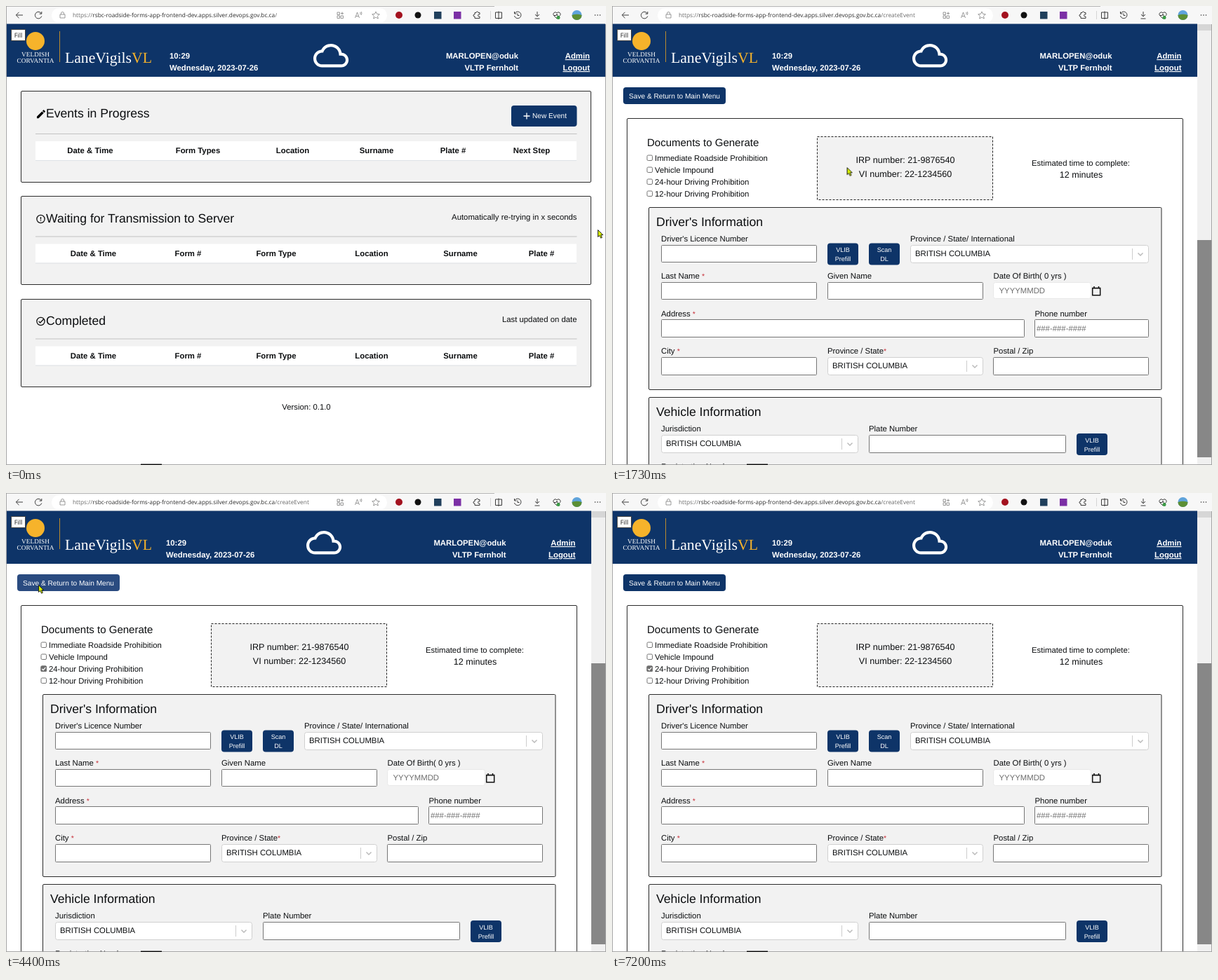
Recreate the animation shown at these times as an HTML page. Size 855 by 655 pixels, loop 8 s.

```html
<!DOCTYPE html>
<html lang="en">
<head>
<meta charset="utf-8">
<title>Roadside forms</title>
<style>
html, body { margin: 0; width: 100%; height: 100%; overflow: hidden; background: #fff; }
svg { display: block; }
text { font: 11.35px "Liberation Sans", Arial, sans-serif; fill: #0c0e10; text-rendering: geometricPrecision; white-space: pre; }
.b { font-weight: bold; }
.w { fill: #fff; }
.h { font-size: 17.6px; }
.doc { font-size: 15px; }
.num { font-size: 12.6px; }
.btn { font-size: 10.15px; fill: #fff; }
.small { font-size: 9.1px; fill: #fff; }
.hint { fill: #6c6c6c; }
.star { fill: #c8323c; font-size: 10.5px; }
.url { font: 8.32px "Open Sans", "Noto Sans", sans-serif; fill: #6a6a6a; }
.host { fill: #2b2b2b; }
.fill { font: 9px "Open Sans", "Noto Sans", sans-serif; fill: #111; }
.status { font: 7.18px "Open Sans", "Noto Sans", sans-serif; fill: #222; }
.brand { font: 21.7px "Liberation Serif", serif; }
.crest { font: 9.3px "Liberation Serif", serif; fill: #fff; }
.u { text-decoration: underline; }
.line { fill: none; stroke: #3c3c3c; stroke-width: 1; }
.soft { fill: none; stroke: #808080; stroke-width: .8; }

.home, .form, .late, .thumb, .status-bar, .over1, .over3 { animation: 8s step-end infinite; }
.home { animation-name: leave; }
.form { animation-name: enter; }
.status-bar { animation-name: loaded; }
.late { animation-name: check; }
.thumb { animation-name: grow; }
.over1 { animation-name: hover1; }
.over3 { animation-name: hover3; }
.save { fill: #0e3468; animation: save 8s linear infinite; }
.cursor { animation: move 8s linear infinite, vanish 8s step-end infinite; }

@keyframes leave { 0% { opacity: 1 } 13.37% { opacity: 0 } 100% { opacity: 0 } }
@keyframes enter { 0% { opacity: 0 } 13.37% { opacity: 1 } 100% { opacity: 1 } }
@keyframes loaded { 0% { opacity: 1 } 21.2% { opacity: 0 } 100% { opacity: 0 } }
@keyframes check { 0% { opacity: 0 } 37.49% { opacity: 1 } 100% { opacity: 1 } }
@keyframes grow { 0% { transform: none } 39.99% { transform: translateY(-91px) } 100% { transform: translateY(-91px) } }
@keyframes hover3 { 0% { stroke: #767676 } 27.4% { stroke: #4f4f4f } 44.5% { stroke: #767676 } 100% { stroke: #767676 } }
@keyframes hover1 { 0% { stroke: #767676 } 46% { stroke: #4f4f4f } 47.5% { stroke: #767676 } 100% { stroke: #767676 } }
@keyframes save {
  0%, 53.3% { fill: #0e3468 }
  55%, 59.1% { fill: #2a4b80 }
  60.9%, 100% { fill: #0e3468 }
}
@keyframes vanish { 0% { opacity: 1 } 89.12% { opacity: 0 } 100% { opacity: 0 } }
@keyframes move {
  0%, .4% { transform: translate(843px, 319px); animation-timing-function: cubic-bezier(.35, 0, .4, 1) }
  5.87%, 15.8% { transform: translate(776px, 160.5px); animation-timing-function: cubic-bezier(.4, 0, .4, 1) }
  26.6% { transform: translate(152px, 259px); animation-timing-function: ease-out }
  31.6%, 33.3% { transform: translate(71px, 250.5px) }
  34.1%, 43.3% { transform: translate(70px, 251px); animation-timing-function: ease-in }
  46.6% { transform: translate(61px, 216.5px); animation-timing-function: ease-out }
  54.1%, 58.3% { transform: translate(46px, 131px); animation-timing-function: ease-in-out }
  65.87% { transform: translate(29px, 62px) }
  67.5% { transform: translate(18px, 43px) }
  69.1%, 73.3% { transform: translate(22px, 46px) }
  74.1%, 100% { transform: translate(19px, 41px) }
}
</style>
</head>
<body>
<svg id="stage" width="855" height="655" viewBox="0 0 855 655"></svg>
<script>
const NAVY = '#0e3468', PALE = '#f2f2f2';
const host = 'rsbc-roadside-forms-app-frontend-dev.apps.silver.devops.gov.bc.ca';

const text = (x, y, s, cls = '', anchor = 'start') =>
  `<text x="${x}" y="${y}" class="${cls}" text-anchor="${anchor}">${s}</text>`;
const mid = (x, y, s, cls) => text(x, y, s, cls, 'middle');
const end = (x, y, s, cls) => text(x, y, s, cls, 'end');
const rect = (x, y, w, h, fill, extra = '') =>
  `<rect x="${x}" y="${y}" width="${w}" height="${h}" fill="${fill}" ${extra}/>`;
const path = (d, extra = 'class="line"') => `<path d="${d}" ${extra}/>`;
const soft = d => path(d, 'class="soft"');
const dot = (x, y, r, fill, extra = '') =>
  `<circle cx="${x}" cy="${y}" r="${r}" fill="${fill}" ${extra}/>`;
const card = (x, y, w, h, fill = PALE) => rect(x, y, w, h, fill, 'stroke="#2b2b2b" rx="1.5"');
const field = (x, y, w, h = 25) => rect(x + .5, y + .5, w - 1, h - 1, '#fff', 'stroke="#767676" rx="1"');
const button = (x, y, w, h) => rect(x, y, w, h, NAVY, 'rx="4"');

function select(x, y, w) {
  const r = x + w;
  return rect(x + .5, y + .5, w - 1, 25, '#fff', 'stroke="#d0d0d0" rx="3"') +
    text(x + 7, y + 16, 'BRITISH COLUMBIA') +
    path(`M${r - 23.5} ${y + 5}v16`, 'stroke="#ccc"') +
    path(`M${r - 15.5} ${y + 11.5}l3.5 3.5 3.5-3.5`, 'fill="none" stroke="#bbb" stroke-width="1.5"');
}

function smallButton(x, y, top, bottom) {
  return button(x, y, 44, 31) + mid(x + 22, y + 12.5, top, 'small') + mid(x + 22, y + 25.5, bottom, 'small');
}

function label(x, y, s, required) {
  return text(x, y, s + (required ? '<tspan class="star">*</tspan>' : ''));
}

function checkbox(y, s, cls) {
  return rect(50, y - 8, 7.5, 7.5, '#fff', `rx="1.5" stroke="#767676" class="${cls}"`) + text(61, y, s);
}

function toolbar() {
  return rect(0, 0, 855, 26, '#f7f7f7') + rect(0, 0, 696, 1, '#b5b5b5') +
    rect(65, 3, 478, 21, '#fff', 'rx="10.5"') +
    path('M24 13H14.5m4-4.2l-4.2 4.2 4.2 4.2') +
    path('M50.5 11a4.8 4.8 0 1 0 .3 3.5M50.8 8v3.2h-3.2') +
    soft('M77 12h7v5h-7zM78.5 12v-1.5a2 2 0 0 1 4 0V12') +
    soft('M472 9h3.5v3.5H472zM472 14h3.5v3.5H472zM477 14h3.5v3.5H477zM479 8.5v4M477 10.5h4') +
    soft('M497.5 17l3-8 3 8m-5-2.5h4m2-5.5q1.500 1 0 3m1.500-4q2 2 0 5') +
    soft('M527 8l1.6 3.4 3.7.4-2.8 2.5.8 3.7-3.3-1.9-3.3 1.9.8-3.7-2.8-2.5 3.7-.4z') +
    dot(560, 13, 5, '#a3121f') + dot(587, 13, 4.5, '#111') +
    rect(610, 8, 10.5, 10.5, '#203f5c') + rect(638, 8, 10.5, 10.5, '#7b2fa5') +
    path('M668 9.5h2a1.5 1.5 0 0 1 3 0h2v2.5h-1a1.5 1.5 0 0 0 0 3h1v2.5h-7v-2.5a1.5 1.5 0 0 1-1-3h1z') +
    path('M690.5 7v12', 'stroke="#d4d4d4"') +
    path('M697.5 9h9v8.5h-9zM702 7.5v11.5') +
    path('M725 10.5a4.8 4.8 0 1 1-.5 3.5M724.5 8v3h3M729 10.5v3h2.5') +
    path('M757 8v7m-3-3l3 3 3-3m-6.5 6h7') +
    path('M785 18l-4.5-4.5a2.8 2.8 0 0 1 4.5-3.5 2.8 2.8 0 0 1 4.5 3.5zM781 13.5h3l1-2 1.5 3h2.5') + dot(787, 16.5, 2.5, '#3a9b45') +
    dot(813.5, 13, 7, '#5fa3dc') + path('M806.5 13a7 7 0 0 0 14 0q-7-2.5-14 0z', 'fill="#5c8f35"') +
    [839.5, 843, 846.5].map(x => dot(x, 13, .8, '#333')).join('');
}

function logo() {
  return dot(42, 50, 13, '#f6b32b') +
    mid(42, 72, 'VELDISH', 'crest') + mid(42, 80.5, 'CORVANTIA', 'crest') +
    path('M76.5 36v44', 'stroke="#b98a2e"') +
    text(84, 80.5, 'LaneVigils<tspan fill="#f6b32b">VL</tspan>', 'brand w') +
    rect(7.5, 33.5, 20, 16, '#fff', 'stroke="#444"') + mid(17.5, 45, 'Fill', 'fill');
}

function header(width, time, cloud, user, link) {
  return rect(1, 25.5, width, 75.5, NAVY) + logo() +
    text(time, 75, '10:29', 'b w') + text(time, 92, 'Wednesday, 2023-07-26', 'b w') +
    path('M19.35 10.04C18.67 6.59 15.64 4 12 4 9.11 4 6.6 5.64 5.35 8.04 2.34 8.36 0 10.91 0 14c0 3.31 2.69 6 6 6h13c2.76 0 5-2.24 5-5 0-2.64-2.05-4.78-4.65-4.96zM19 18H6c-2.21 0-4-1.79-4-4s1.79-4 4-4h.71C7.37 7.69 9.48 6 12 6c3.04 0 5.5 2.46 5.5 5.5v.5H19c1.66 0 3 1.34 3 3s-1.34 3-3 3z',
      `fill="#fff" transform="translate(${cloud} 45.7) scale(2.09)"`) +
    end(user, 75, 'MARLOPEN@oduk', 'b w') + end(user, 92, 'VLTP Fernholt', 'b w') +
    end(link, 75, 'Admin', 'b w u') + end(link, 92, 'Logout', 'b w u');
}

function table(y, cols, names) {
  return path(`M42 ${y - 10.5}h771.5`, 'stroke="#c2c2c2"') +
    rect(42, y, 771, 27, '#fff') + path(`M42 ${y + 27.5}h771`, 'stroke="#dee2e6"') +
    cols.map((x, i) => mid(x, y + 17, names[i], 'b')).join('');
}

function home() {
  const cols = [124.5, 259.5, 385, 521, 647.5, 763];
  const names = ['Date &amp; Time', 'Form #', 'Form Type', 'Location', 'Surname', 'Plate #'];
  const ring = 'stroke="#111" stroke-width="1.3"';
  return header(853, 233, 438, 730, 832) +
    card(21.5, 121.5, 812, 130) + card(21.5, 271.5, 812, 126) + card(21.5, 418.5, 812, 125) +
    path('M3 17.25V21h3.75L17.81 9.94l-3.75-3.75zM20.71 7.04c.39-.39.39-1.02 0-1.41l-2.34-2.34c-.39-.39-1.02-.39-1.41 0l-1.83 1.83 3.75 3.75z',
      'transform="translate(42 146.3) scale(.66)"') +
    dot(49.5, 304, 5.6, 'none', ring) + path('M49.5 301v3.7m0 1v1.4', ring) +
    dot(49.5, 450, 5.6, 'none', ring) + path('M46.7 450l2 2 5-5.3', 'fill="none" ' + ring) +
    text(57, 158.5, 'Events in Progress', 'h') +
    text(57, 308.5, 'Waiting for Transmission to Server', 'h') +
    text(57, 455, 'Completed', 'h') +
    button(720, 142, 93.5, 30) + path('M737.5 157h9m-4.5-4.5v9', 'stroke="#fff" stroke-width="1.3"') +
    text(750, 160, 'New Event', 'btn') +
    end(813.5, 304.5, 'Automatically re-trying in x seconds') +
    end(813.5, 451, 'Last updated on date') +
    table(193, [120, 273.5, 408.5, 528, 637, 749],
      ['Date &amp; Time', 'Form Types', 'Location', 'Surname', 'Plate #', 'Next Step']) +
    table(339.5, cols, names) + table(485.5, cols, names) +
    mid(428, 576, 'Version: 0.1.0');
}

function driver() {
  return card(52.5, 287.5, 730.5, 260) + text(63, 314, "Driver's Information", 'h') +
    label(70, 335.5, "Driver's Licence Number") + field(70, 341, 222) +
    smallButton(307, 338.5, 'VLIB', 'Prefill') + smallButton(366, 338.5, 'Scan', 'DL') +
    label(425, 335.5, 'Province / State/ International') + select(425, 341, 340) +
    label(70, 389, 'Last Name ', 1) + field(70, 394, 222) +
    label(307, 389, 'Given Name') + field(307, 394, 222) +
    label(543.5, 389, 'Date Of Birth( 0 yrs )') +
    rect(543.5, 394.5, 139, 23, '#fff', 'stroke="#e8e8e8" rx="3"') + text(551.5, 409.5, 'YYYYMMDD', 'hint') +
    path('M684.7 402.5h11v10.3h-11zM684.7 402.8h11M687 400v2m6.5-2v2', 'fill="none" stroke="#111" stroke-width="1.5"') +
    label(70, 442.5, 'Address ', 1) + field(70, 447, 518, 26) +
    label(602.5, 442.5, 'Phone number') + field(602, 447, 163, 26) + text(605, 464, '###-###-####', 'hint') +
    label(70, 496, 'City ', 1) + field(70, 501, 222, 26) +
    label(307, 496, 'Province / State', 1) + select(307, 501, 222) +
    label(543.5, 496, 'Postal / Zip') + field(543, 501, 222, 26);
}

function form() {
  return rect(0, 26, 855, 629, '#fff') + header(833, 228, 428, 712.5, 811.5) +
    rect(16, 116, 146, 24, NAVY, 'rx="4" class="save"') + text(24, 131.5, 'Save &amp; Return to Main Menu', 'btn') +
    card(21.5, 160.5, 792, 520, '#fff') +
    text(50, 199.5, 'Documents to Generate', 'doc') +
    checkbox(221, 'Immediate Roadside Prohibition', 'over1') + checkbox(238, 'Vehicle Impound', '') +
    checkbox(255, '24-hour Driving Prohibition', 'over3') + checkbox(272, '12-hour Driving Prohibition', '') +
    `<g class="late">${rect(49.5, 246.5, 8.5, 8.5, '#6e6e6e', 'rx="1.5"')}${path('M51.3 251l1.8 1.8 3.3-4', 'fill="none" stroke="#fff" stroke-width="1.3"')}</g>` +
    rect(292.5, 186.5, 250, 90, PALE, 'stroke="#222" stroke-dasharray="3 2"') +
    mid(418, 223.5, 'IRP number: 21-9876540', 'num') + mid(418, 243.5, 'VI number: 22-1234560', 'num') +
    mid(668, 228, 'Estimated time to complete:') + mid(668.5, 245, '12 minutes', 'num') +
    driver() +
    card(52.5, 558.5, 730.5, 120) + text(63, 585, 'Vehicle Information', 'h') +
    label(70, 607, 'Jurisdiction') + select(70, 612, 281) +
    label(366, 607, 'Plate Number') + field(366, 612, 281, 26) +
    smallButton(662, 610, 'VLIB', 'Prefill') + label(70, 660.5, 'Registration Number') +
    rect(834, 26, 21, 629, '#f0f0f0') + rect(834, 26, 21, 9, '#d6d6d6') +
    `<g clip-path="url(#track)"><g class="thumb">${rect(834, 334, 21, 420, '#878787')}</g></g>` +
    `<g class="status-bar">${path('M1 640h281q3 0 3 3v12H1z', 'fill="#d8d8d8"')}${text(4, 650, `Waiting for ${host}...`, 'status')}</g>`;
}

document.getElementById('stage').innerHTML =
  '<clipPath id="track"><rect x="834" y="35" width="21" height="609"/></clipPath>' +
  rect(0, 0, 855, 655, '#fff') + toolbar() +
  `<g class="home">${home()}</g><g class="form">${form()}</g>` +
  text(95, 16.3, `https://<tspan class="host">${host}</tspan>/createEvent`, 'url') +
  `<g class="home">${rect(386, 6, 70, 15, '#fff')}</g>` +
  path('M.5 0v655M854.5 26v629M0 654.5h855', 'fill="none" stroke="#a6a6a6"') +
  rect(192, 653.5, 30, 1.5, '#111') +
  path('M.5 .5V10.5L2.8 8.5 4.6 12.2 6.4 11.3 4.7 7.7H7.8Z',
    'class="cursor" fill="#d6f000" stroke="#111" stroke-width=".9" stroke-linejoin="round"');
</script>
</body>
</html>
```
